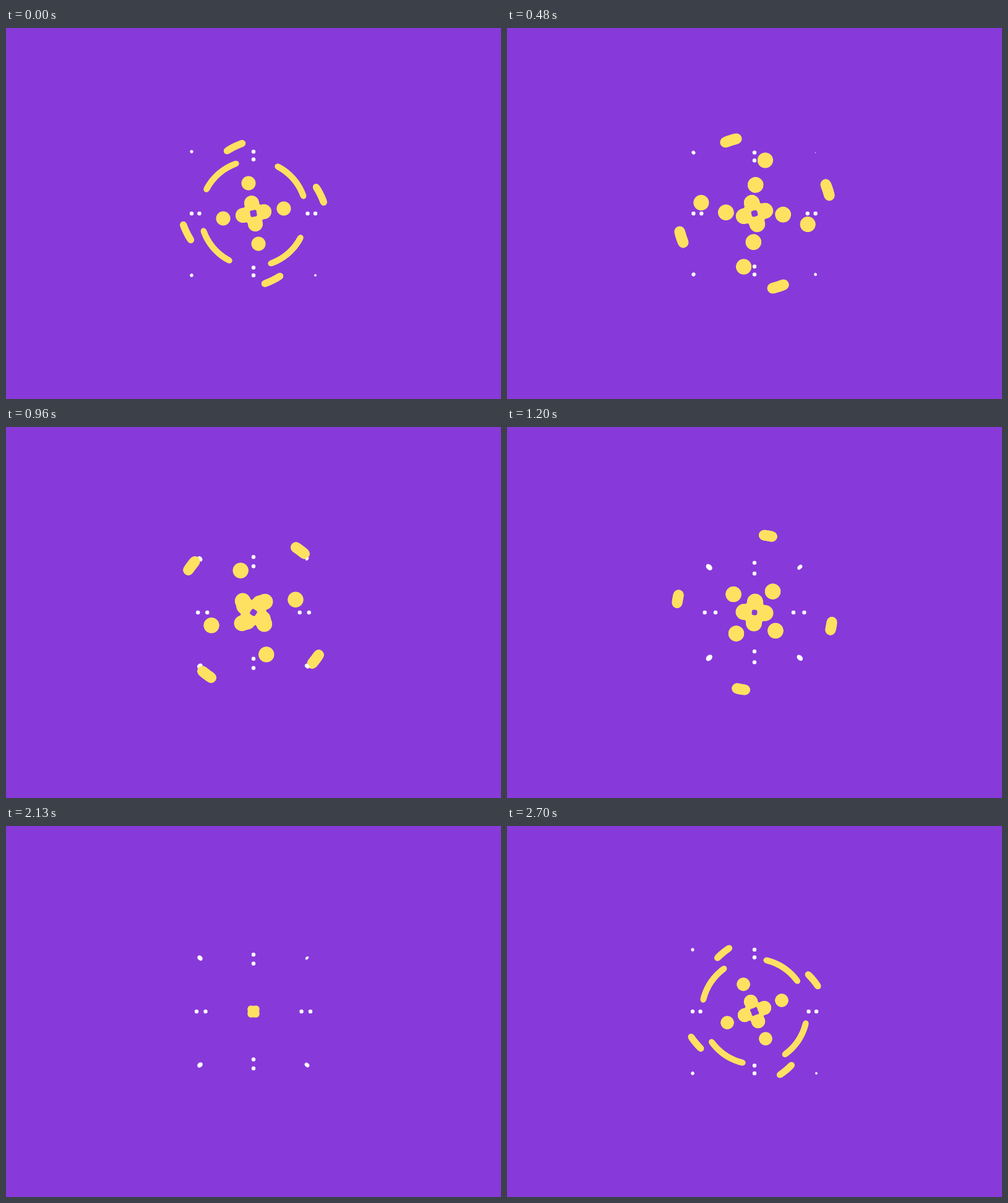
Write an HTML page that moves like this. It is 800 px wide and 600 px high and loops after 2730 ms.

```html
<!DOCTYPE html>
<html lang="en">
<head>
<meta charset="utf-8">
<title>Orbiting beads</title>
<style>
  html, body { margin: 0; width: 100%; height: 100%; overflow: hidden; background: #8839da; }
  svg { display: block; width: 100vw; height: 100vh; }
  #beads { fill: none; stroke: #ffe262; stroke-linecap: round; stroke-linejoin: round; }
  circle, ellipse { fill: #fff; }
</style>
</head>
<body>
<svg viewBox="-400 -300 800 600">
  <filter id="goo" filterUnits="userSpaceOnUse" x="-200" y="-200" width="400" height="400" color-interpolation-filters="sRGB">
    <feGaussianBlur stdDeviation="2"/>
    <feColorMatrix values="1 0 0 0 0  0 1 0 0 0  0 0 1 0 0  0 0 0 8 -3.5"/>
    <feComponentTransfer><feFuncR type="linear" slope="0" intercept="1"/><feFuncG type="linear" slope="0" intercept=".886"/><feFuncB type="linear" slope="0" intercept=".384"/></feComponentTransfer>
  </filter>
  <g id="back"></g>
  <g id="beads" filter="url(#goo)"></g>
  <g id="front"></g>
</svg>
<script>
const LOOP = 2730, STEP = 30, TURN = 1650;
const KEYS = [0, 240, 720, 1200, 1650, 2130, 2700];
const mix = (a, b, k) => a + (b - a) * k;

// Monotone cubic through the keys, periodic; gain is added on every loop.
function track(values, gain = 0) {
  const n = KEYS.length;
  const wrap = i => (i + n) % n, laps = i => Math.floor(i / n);
  const time = i => KEYS[wrap(i)] + LOOP * laps(i);
  const value = i => values[wrap(i)] + gain * laps(i);
  const slope = i => (value(i + 1) - value(i)) / (time(i + 1) - time(i));
  const tangent = i => {
    const a = slope(i - 1), b = slope(i);
    return a * b > 0 ? 2 * a * b / (a + b) : 0;
  };
  return t => {
    let i = n - 1;
    while (KEYS[i] > t) i--;
    const h = time(i + 1) - time(i), s = (t - time(i)) / h, q = 1 - s;
    return value(i) * (1 + 2 * s) * q * q + value(i + 1) * s * s * (3 - 2 * s)
         + h * s * q * (tangent(i) * q - tangent(i + 1) * s);
  };
}

const zero = () => 0;
const spin = track([-16, 77.3, 239.7, 370, 486.6, 585, 871.8], 900);
const coreWidth = track([24.5, 26, 26, 26, 26, 11, 23]);
const rings = [
  { radius: track([17.3, 17.5, 18, 17.5, 9, 6, 17]),
    offset: track([6, 4.7, 2, -7, 0, 0, 7.6]),
    width: coreWidth, span: zero, stretch: zero },
  { radius: track([49.6, 53, 35, 17.5, 9, 6, 47.5]),
    offset: track([6.7, 10.4, 27, -7, 0, 0, 6]),
    width: t => coreWidth(t) - (t < 120 || t > 2400 ? 1 : 0), span: zero, stretch: zero },
  { radius: track([85.5, 87.5, 88, 45, 15, 6, 85]),
    offset: track([-25, 10.7, 38, 31, 0, 0, -28]),
    width: track([10, 25.5, 25.5, 26, 16, 11, 10]),
    span: track([44, 0, 0, 0, 0, 0, 42]), stretch: zero },
  { radius: track([112.4, 123.3, 125, 126, 39, 6, 107.8]),
    offset: zero,
    width: track([11.5, 18, 17.5, 17.5, 15.5, 11, 11]),
    span: track([14, 8.4, 9, 6, 0, 0, 13]),
    stretch: track([2.5, 0, 0, 0, 16, 0, 2.5]) }
];

function add(parent, tag) {
  const node = document.createElementNS("http://www.w3.org/2000/svg", tag);
  return document.getElementById(parent).appendChild(node);
}
function set(node, attrs) {
  for (const name in attrs) node.setAttribute(name, attrs[name]);
}

for (const ring of rings) ring.node = add("beads", "path");

const dots = [];
for (const [x, y] of [[1, 0], [0, 1], [-1, 0], [0, -1]])
  for (const [near, far] of [[50, 100], [25, 87.5]])
    dots.push({ x, y, near, far, node: add("back", "circle") });

const corners = [[-1, -1, 2.6], [-1, 1, 2.7], [1, -1, 0], [1, 1, 1.9]].map(
  ([x, y, size]) => ({ x, y, size, node: add(x < 0 ? "back" : "front", "ellipse") }));

function ringPath(t, { radius, offset, span, stretch }) {
  const r = radius(t), angle = spin(t) + offset(t), half = span(t) / 2, pull = stretch(t);
  let d = "";
  for (let arm = 0; arm < 4; arm++)
    for (let k = -4; k <= 4; k++) {
      const a = (angle + arm * 90 + half * k / 4) * Math.PI / 180, rk = r + pull * k / 4;
      d += (k > -4 ? "L" : "M") + (rk * Math.sin(a)).toFixed(2) + " " + (-rk * Math.cos(a)).toFixed(2);
    }
  return d;
}

// Cubic ease-out from the centre until start, then cubic ease-in back.
function spread(t, start) {
  const u = (t - TURN + LOOP) % LOOP, out = LOOP - TURN + start;
  return u < out ? 1 - (1 - u / out) ** 3 : 1 - ((u - out) / (LOOP - out)) ** 3;
}

function draw(t) {
  for (const ring of rings)
    set(ring.node, { d: ringPath(t, ring), "stroke-width": ring.width(t) });

  const axis = spread(t, -30);
  for (const { x, y, near, far, node } of dots) {
    const r = mix(near, far, axis);
    set(node, { cx: x * r, cy: y * r, r: 3.2 });
  }

  const diagonal = spread(t, 45), grow = (1 - diagonal) ** 0.6, c = mix(28.3, 100, diagonal);
  for (const { x, y, size, node } of corners)
    set(node, {
      rx: mix(size, 8.5, grow), ry: mix(size, 5.5, grow),
      transform: `translate(${x * c} ${y * c}) rotate(${x * y * 45})`
    });
}

function tick() {
  draw(Math.floor(performance.now() % LOOP / STEP) * STEP);
  requestAnimationFrame(tick);
}
tick();
</script>
</body>
</html>
```
